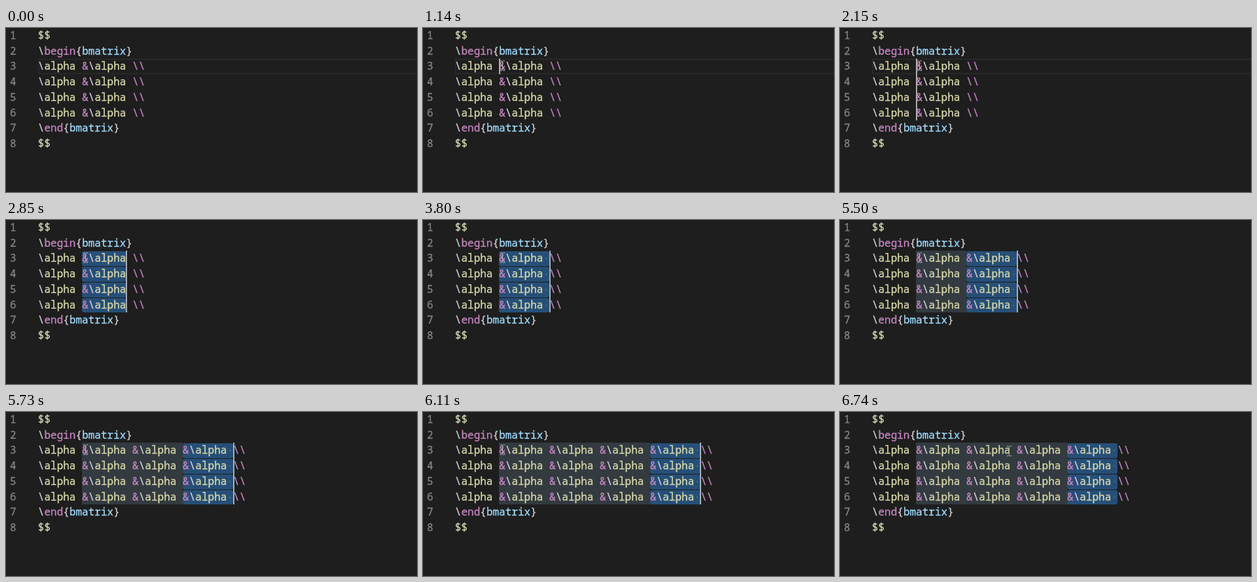
An HTML page with a canvas that plays this animation: 628 px wide and 252 px high, repeating every 6.82 s.

```html
<!DOCTYPE html>
<html>
<head>
<meta charset="utf-8">
<style>
  html, body { margin: 0; width: 100%; height: 100%; overflow: hidden; background: #1e1e1e; }
  canvas { display: block; }
</style>
</head>
<body>
<canvas width="628" height="252"></canvas>
<script>
const ctx = document.querySelector('canvas').getContext('2d', { alpha: false });
const LOOP = 6820, LEFT = 48.8, CHAR = 9.62, LINE = 23.75, CELL = 8, START = 7;

// Times of the edits
const CLICK = 910, ADD_CARET = [1770, 1920, 2150];
const SELECT = [2700, 2850, 3080], SHRINK = [3630, 3800], PASTE = [5500, 5730, 6110];
const EDITS = [CLICK, ...ADD_CARET, ...SELECT, ...SHRINK, ...PASTE];

const PINK = '#c586c0', YELLOW = '#dcdcaa', WHITE = '#d4d4d4';
const COLORS = {
  '$$': '#cdd9b0', '\\': WHITE, '\\\\': PINK, '&': PINK, begin: PINK, end: PINK,
  alpha: YELLOW, bmatrix: '#9cdcfe', '{': WHITE, '}': WHITE
};
const TOKEN = /\$\$|\\\\|\\|&|[{}]|[a-z]+/g;

const passed = (times, t) => times.filter(s => s <= t).length;
const colX = c => LEFT + c * CHAR;
const rowY = r => Math.round(r * LINE - 0.25);

function box(color, x, y, w, h, radius = 0) {
  ctx.fillStyle = color;
  ctx.beginPath();
  ctx.roundRect(x, y, w, h, radius);
  ctx.fill();
}

function text(str, x, row, color) {
  const y = Math.round(row * LINE + 16.9);
  ctx.fillStyle = ctx.strokeStyle = color;
  ctx.fillText(str, x, y);
  ctx.strokeText(str, x, y);
}

// The caret restarts its blink at every edit
function caretOn(t) {
  const last = EDITS[passed(EDITS, t) - 1];
  return (t - last + 40) % 1000 < 500;
}

function pointerAt(t) {
  if (t >= 6740) return [258.5, 60];
  const p = Math.min(1, Math.floor((t - 70) / 74) / 5);
  const x = 413.5 - 292 * Math.sin(p * Math.PI / 2);
  const y = 58 + 138 * (1 - p) ** 2 - 20 * Math.sin(p * Math.PI);
  return [x, y];
}

function drawPointer(x, y) {
  ctx.strokeStyle = '#b4b4b4';
  ctx.lineWidth = 1;
  ctx.beginPath();
  for (const s of [-1, 1]) {
    const end = y + s * 7.5;
    ctx.moveTo(x - 3.5, end);
    ctx.lineTo(x - 1, end);
    ctx.lineTo(x, end - s);
    ctx.lineTo(x + 1, end);
    ctx.lineTo(x + 3.5, end);
  }
  ctx.moveTo(x, y - 7);
  ctx.lineTo(x, y + 7);
  ctx.stroke();
}

function draw(t) {
  const rows = 1 + passed(ADD_CARET, t);
  const cells = 1 + passed(PASTE, t);
  const length = [0, 2, 7, 10][passed(SELECT, t)] - passed(SHRINK, t);
  const from = START + (cells - 1) * CELL;
  const row = '\\alpha ' + '&\\alpha '.repeat(cells) + '\\\\';
  const lines = ['$$', '\\begin{bmatrix}', row, row, row, row, '\\end{bmatrix}', '$$'];

  box('#1e1e1e', 0, 0, 628, 252);
  if (!length) {
    ctx.strokeStyle = '#282828';
    ctx.lineWidth = 2;
    ctx.strokeRect(50, 48, 600, 22);
  }

  const left = Math.round(colX(from)), right = Math.round(colX(from + length));
  for (let r = 2; r < 6 && length; r++) {
    const y = rowY(r), h = rowY(r + 1) - y;
    if (cells > 1) box('#333a40', 116, y, left - 116, h);
    box('#264f78', left, y + 1, right - left, h - 1, 3);
    if (length >= CELL) box('#4a6b8d', colX(from + 7.5) - 1, y + 11, 2, 2);
  }

  ctx.font = `${CHAR / 0.6}px "Noto Sans Mono", monospace`;
  ctx.lineWidth = 0.3;
  lines.forEach((line, r) => {
    text(r + 1, 6, r, '#858585');
    for (const m of line.matchAll(TOKEN)) text(m[0], colX(m.index), r, COLORS[m[0]]);
  });

  if (caretOn(t)) {
    const x = Math.floor(colX(from + length));
    for (let r = 2; r < 2 + rows; r++) box('#aeafad', x, rowY(r), 2, rowY(r + 1) - rowY(r));
  }

  // Click highlight
  if (t >= CLICK && t < 1140) box('rgba(255,255,0,.47)', 104, 41, 30, 30, 15);
  if (t >= 70) drawPointer(...pointerAt(t));
}

const begin = performance.now();
function tick() {
  draw((performance.now() - begin) % LOOP);
  requestAnimationFrame(tick);
}
tick();
</script>
</body>
</html>
```
